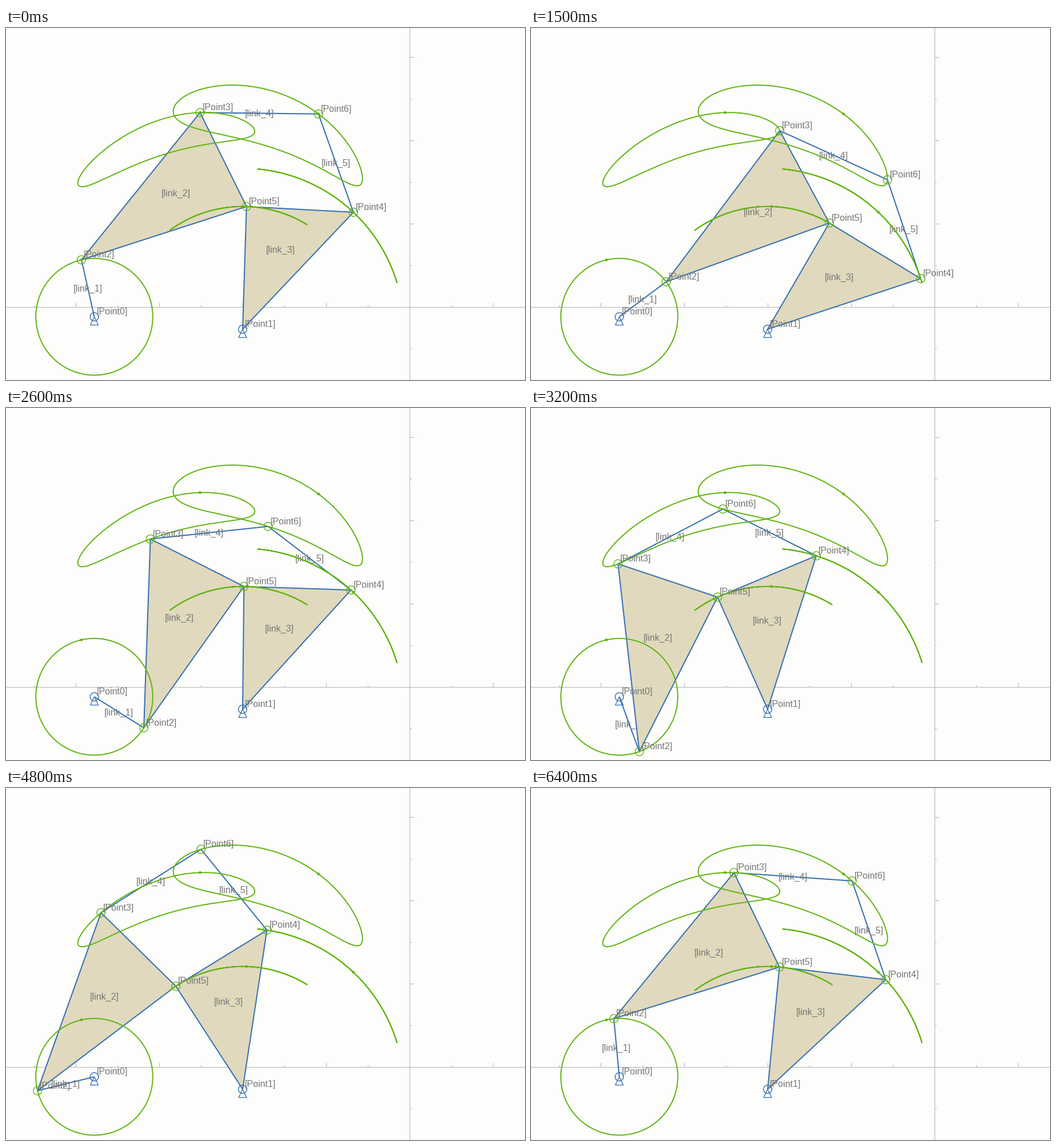
These frames come from a looping animation (908x617 px, 6500 ms). A matplotlib script:

```python
import numpy as np
import matplotlib.pyplot as plt
from matplotlib.animation import FuncAnimation
from matplotlib.patches import Circle, Polygon

W, H, DPI = 908, 617, 64
PX = 72 / DPI                      # one pixel in points
FRAMES, INTERVAL = 65, 100

PAPER, GRAY, AXIS = "#fdfdfc", "#767676", "#b2b2b2"
BLUE, GREEN, FILL = "#356fae", "#62b413", "#e0d9bd"

BASE0 = np.array([154.5, 506.2])
BASE1 = np.array([414.0, 528.0])
CRANK = 102.3

# Crank angle in degrees, clockwise from straight up
KEY_FRAME = [0, 4.35, 10, 20, 32, 48, 57, 64]
KEY_ANGLE = [-12.7, -12.7, 22.1, 84.3, 160, 256.2, 312.6, 354.65]

LINKS = [(0, 2), (2, 3, 5), (1, 5, 4), (3, 6), (6, 4)]


def meet(a, ra, b, rb):
    """Point at distance ra from a and rb from b, left of the way a to b."""
    d = b - a
    dist = np.hypot(*d)
    u = d / dist
    along = (ra**2 - rb**2 + dist**2) / (2 * dist)
    up = np.sqrt(max(ra**2 - along**2, 0))
    return a + along * u + up * np.array([u[1], -u[0]])


def solve(angle):
    """Positions of all seven points for a crank angle."""
    t = np.radians(angle)
    p2 = BASE0 + CRANK * np.array([np.sin(t), -np.cos(t)])
    p5 = meet(p2, 303.5, BASE1, 215.2)
    p3 = meet(p2, 331.2, p5, 183.6)
    p4 = meet(p5, 187.3, BASE1, 282.1)
    p6 = meet(p3, 207.2, p4, 182.8)
    return np.array([BASE0, BASE1, p2, p3, p4, p5, p6])


fig = plt.figure(figsize=(W / DPI, H / DPI), dpi=DPI, facecolor=PAPER)
ax = fig.add_axes([0, 0, 1, 1])
ax.set_xlim(0, W)
ax.set_ylim(H, 0)
ax.axis("off")


def line(xs, ys, color, width, z):
    return ax.plot(xs, ys, color=color, lw=width * PX, zorder=z)[0]


def label(text, z, **align):
    return ax.text(0, 0, text, family="Liberation Sans", size=16 * PX,
                   color=GRAY, va="baseline", zorder=z, **align)


def draw_axes():
    ox, oy, step = 705.5, 488.5, 73
    line([0, W], [oy, oy], AXIS, 1, 0)
    line([ox, ox], [0, H], AXIS, 1, 0)
    for k in range(-9, 3):
        size = 3 if k % 2 else 7
        x = ox + k * step
        line([x, x], [oy - size, oy], AXIS, 1, 0)
    for k in range(-6, 2):
        size = 3 if k % 2 else 7
        y = oy + k * step
        line([ox, ox + size], [y, y], AXIS, 1, 0)


def draw_trails():
    path = np.array([solve(a) for a in np.linspace(0, 360, 361)])
    start = solve(KEY_ANGLE[0])
    for k in range(2, 7):
        line(path[:, k, 0], path[:, k, 1], GREEN, 2, 20)
        ax.add_patch(Circle(start[k], 2.4, color=GREEN, lw=0, zorder=20))


def draw_ground(p):
    x, y = p
    ax.add_patch(Polygon([(x, y), (x - 7, y + 14.5), (x + 7, y + 14.5)],
                         fill=False, ec=BLUE, lw=1.3 * PX, zorder=21))


draw_axes()
draw_trails()
draw_ground(BASE0)
draw_ground(BASE1)

bodies, link_labels = [], []
for n, link in enumerate(LINKS):
    z = 2 + 2 * n
    body = Polygon(np.zeros((len(link), 2)), closed=len(link) > 2,
                   fill=len(link) > 2, fc=FILL, ec=BLUE, lw=2 * PX,
                   joinstyle="round", zorder=z)
    bodies.append(ax.add_patch(body))
    link_labels.append(label(f"[link_{n + 1}]", z + 1, ha="center"))

rings, point_labels = [], []
for k in range(7):
    ring = Circle((0, 0), 7.3, fill=False, ec=BLUE if k < 2 else GREEN,
                  lw=1.4 * PX, zorder=22)
    rings.append(ax.add_patch(ring))
    point_labels.append(label(f"[Point{k}]", 23, ha="left"))


def update(i):
    pts = solve(np.interp(i, KEY_FRAME, KEY_ANGLE))
    for link, body, text in zip(LINKS, bodies, link_labels):
        corners = pts[list(link)]
        body.set_xy(corners)
        x, y = corners.mean(axis=0)
        text.set_position((x, y + 5.5))
    for p, ring, text in zip(pts, rings, point_labels):
        ring.center = p
        text.set_position((p[0] + 4, p[1] - 4))
    return bodies + link_labels + rings + point_labels


anim = FuncAnimation(fig, update, frames=FRAMES, interval=INTERVAL,
                     init_func=lambda: update(0), repeat=True, repeat_delay=0)
plt.show()
```
